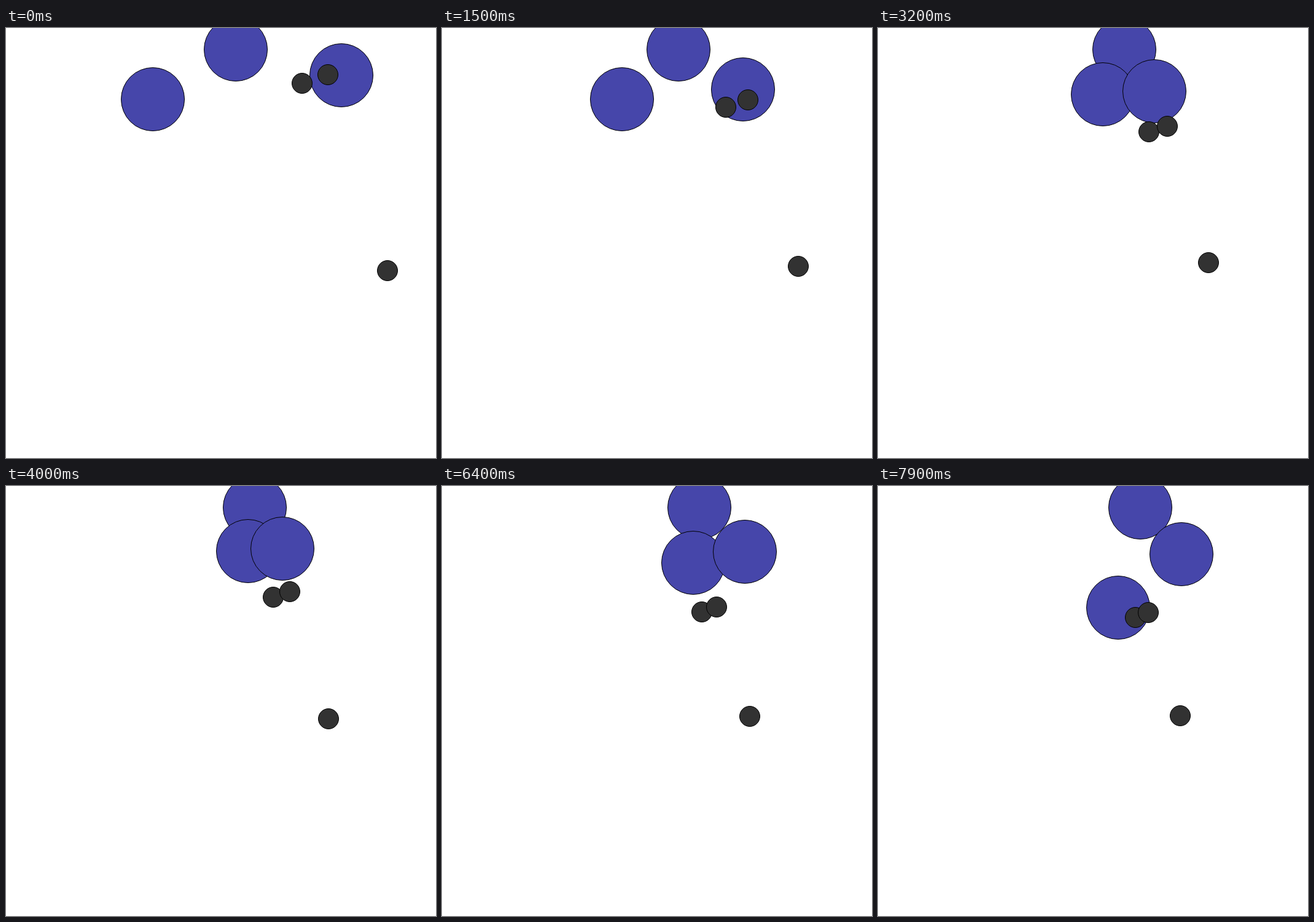
Animation, 700 px wide and 700 px high, one loop 8000 ms. Source, as an HTML page with a canvas:

```html
<!DOCTYPE html>
<html lang="en">
<head>
<meta charset="utf-8">
<title>Drifting discs</title>
<style>
  html, body { margin: 0; width: 100%; height: 100%; overflow: hidden; background: #fff; }
  canvas { display: block; }
</style>
</head>
<body>
<canvas id="stage" width="700" height="700"></canvas>
<script>
const ctx = document.getElementById('stage').getContext('2d');
const LOOP = 8000, STEP = 100;
const BLUE = '#4646aa', DARK = '#323232';

// Smooth curve through [seconds, value] keys
function curve(keys) {
  const rate = i => (keys[i + 1][1] - keys[i][1]) / (keys[i + 1][0] - keys[i][0]);
  const last = keys.length - 1;
  const slopes = keys.map(([t], i) => {
    if (i === 0) return rate(0);
    if (i === last) return rate(last - 1);
    const before = t - keys[i - 1][0], after = keys[i + 1][0] - t;
    return (rate(i - 1) * after + rate(i) * before) / (before + after);
  });
  return t => {
    let i = 0;
    while (i < last - 1 && t > keys[i + 1][0]) i++;
    const [t0, a] = keys[i], [t1, b] = keys[i + 1];
    const h = t1 - t0, u = (t - t0) / h, v = 1 - u;
    return a * (1 + 2 * u) * v * v + b * u * u * (3 - 2 * u)
      + h * u * v * (slopes[i] * v - slopes[i + 1] * u);
  };
}

// The dark discs share one progress, each along a straight line
const travel = curve([[0, 0], [0.9, 23], [1.5, 41], [1.8, 49], [2.4, 64.9], [2.7, 72.4],
  [3.6, 89.6], [4, 95.3], [5.1, 108.95], [6.4, 119.5], [7.9, 129]]);

function glide(x, y, dx, dy) {
  const p = t => travel(t) / 129;
  return { r: 17, fill: DARK, x: t => x + dx * p(t), y: t => y + dy * p(t) };
}

const discs = [
  { r: 52, fill: BLUE,
    x: curve([[0, 374], [1.5, 385], [2.4, 395], [4, 405], [5.1, 409], [6.4, 419], [7.9, 427]]),
    y: () => 35 },
  { r: 52, fill: BLUE,
    x: curve([[0, 239], [0.9, 267], [1.5, 293], [1.8, 305], [2.4, 332], [2.7, 345], [3.6, 381],
      [4, 394], [4.6, 380], [5.1, 387], [5.4, 394], [6.4, 409], [7.2, 402], [7.9, 391]]),
    y: curve([[0, 116], [1.5, 116], [2.4, 112], [4, 106], [5.1, 110], [6.4, 125],
      [7.2, 156], [7.9, 198]]) },
  { r: 52, fill: BLUE,
    x: curve([[0, 546], [1.5, 490], [2.4, 464], [3, 453], [3.5, 448], [4, 450], [4.5, 474],
      [5.1, 488], [5.4, 489], [6.4, 493], [7.9, 494]]),
    y: curve([[0, 77], [0.9, 93], [1.5, 100], [2.4, 103], [4, 102], [5.1, 102], [6.4, 107],
      [7.9, 111]]) },
  glide(481.8, 89.6, -63, 124.3),
  glide(524.45, 76.1, -83.98, 130),
  glide(620.6, 395.22, -129, -21.3)
];

function draw(t) {
  ctx.fillStyle = '#fff';
  ctx.fillRect(0, 0, 700, 700);
  ctx.strokeStyle = '#000';
  ctx.lineWidth = 1;
  for (const d of discs) {
    ctx.beginPath();
    ctx.arc(Math.round(d.x(t)), Math.round(d.y(t)), d.r - 0.5, 0, Math.PI * 2);
    ctx.fillStyle = d.fill;
    ctx.fill();
    ctx.stroke();
  }
}

const start = performance.now();
function tick() {
  const ms = (performance.now() - start) % LOOP;
  draw(Math.floor(ms / STEP) * STEP / 1000);
  requestAnimationFrame(tick);
}
tick();
</script>
</body>
</html>
```
